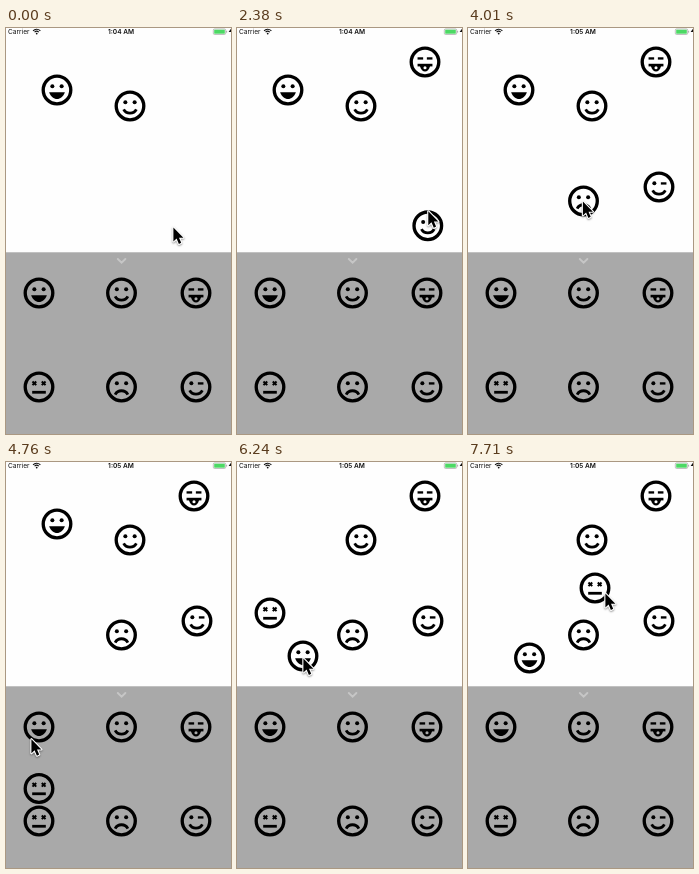
An HTML page with a canvas for the animation above (8 s loop, 225 by 406 pixels).

```html
<!DOCTYPE html>
<html lang="en">
<head>
<meta charset="utf-8">
<style>
  html, body { margin: 0; width: 100%; height: 100%; overflow: hidden; background: #fefefe; }
  canvas { display: block; width: 225px; height: 406px; }
</style>
</head>
<body>
<canvas id="stage"></canvas>
<script>
const W = 225, H = 406, LOOP = 8000;
const STEP = 148.2, LAST = 52;   // the picture advances in even steps
const LAG = 0.3;                 // a dragged face trails the pointer, in steps
const PANEL = '#a9a9a9', PAPER = '#fefefe';
const canvas = document.getElementById('stage');
const ctx = canvas.getContext('2d');
const dpr = window.devicePixelRatio || 1;
canvas.width = W * dpr;
canvas.height = H * dpr;

const columns = [33, 115.5, 190], rows = [265, 359];
const slots = {};
['grin', 'smile', 'tongue', 'dead', 'sad', 'wink'].forEach((kind, i) => {
  slots[kind] = [columns[i % 3], rows[Math.floor(i / 3)]];
});

const board = { grin: [51, 62], smile: [124, 78] };
const home = [167, 199];

// The pointer reaches for a face, then pulls it; spans are in steps
const drags = [
  { kind: 'tongue', grip: [-7, 5], reach: [0, 2], pull: [3, 5.7], to: [188, 34] },
  { kind: 'wink', grip: [0, 2], reach: [8, 9.9], bow: -33, pull: [12.9, 16.8], to: [191, 159] },
  { kind: 'sad', grip: [-1, 0], reach: [19, 23], pull: [24, 26.7], to: [115.5, 173] },
  { kind: 'dead', grip: [-8, -9], reach: [28, 31], pull: [31.2, 33.2], to: [33, 151] },
  { kind: 'grin', grip: [0, 2], reach: [35, 37], pull: [38, 41.7], to: [66, 194] },
  { kind: 'grin', grip: [0, 2], reach: [41.7, 42], pull: [42, 43], to: [61.5, 196] },
  { kind: 'dead', grip: [10, 5], reach: [44, 46], pull: [46, 49.7], to: [139, 126] },
  { kind: 'dead', grip: [10, 5], reach: [49.7, 50], pull: [50, 51.7], to: [127, 126] }
];

function glide([ax, ay], [bx, by], [t0, t1], t, bow = 0) {
  const u = Math.max(0, Math.min(1, (t - t0) / (t1 - t0)));
  const e = u * u * (3 - 2 * u);
  return [ax + (bx - ax) * e + bow * Math.sin(Math.PI * u), ay + (by - ay) * e];
}

const add = (p, q) => [p[0] + q[0], p[1] + q[1]];

function pose(n) {
  const faces = { ...board }, rest = { ...slots, ...board };
  let pointer = home;
  for (const { kind, grip, reach, bow, pull, to } of drags) {
    pointer = glide(pointer, add(rest[kind], grip), reach, n, bow);
    pointer = glide(pointer, add(to, grip), pull, n);
    if (n > pull[0]) faces[kind] = glide(faces[kind] || rest[kind], to, pull, n - LAG);
    rest[kind] = to;
  }
  return { faces, pointer };
}

function line(width, ...pts) {
  ctx.lineWidth = width;
  ctx.beginPath();
  pts.forEach(([x, y]) => ctx.lineTo(x, y));
  ctx.stroke();
}

function dot(x, y, r) {
  ctx.beginPath();
  ctx.arc(x, y, r, 0, 7);
  ctx.fill();
}

function bowl(half, y, depth) {
  ctx.beginPath();
  ctx.moveTo(-half, y);
  ctx.bezierCurveTo(-half * 0.6, y + depth, half * 0.6, y + depth, half, y);
}

function lips(y, depth) {
  bowl(4.1, y, depth);
  ctx.lineWidth = 1.8;
  ctx.stroke();
}

const roundEye = x => dot(x, -2.4, 1.3);
const shutEye = x => line(1.5, [x - 1.8, -2.3], [x + 1.8, -2.3]);
function crossEye(x) {
  for (const s of [-1.2, 1.2]) line(1.3, [x - s, -3.6], [x + s, -1.2]);
}
const eyes = (left, right = left) => { left(-3); right(3); };

const features = {
  grin() { eyes(roundEye); bowl(5.1, 1.5, 5.8); ctx.fill(); },
  smile() { eyes(roundEye); lips(2.1, 3.3); },
  sad() { eyes(roundEye); lips(4.9, -3.3); },
  wink() { eyes(roundEye, shutEye); lips(2.1, 3.3); },
  dead() { eyes(crossEye); line(1.8, [-4.4, 3.4], [4.4, 3.4]); },
  tongue(bg) {
    eyes(shutEye);
    line(1.7, [-4.8, 2], [4.8, 2]);
    bowl(3.3, 2.6, 4.8);
    ctx.fill();
    ctx.fillStyle = bg;
    dot(0, 3.7, 1);
  }
};

function face(kind, [x, y], bg) {
  ctx.save();
  ctx.translate(x, y);
  ctx.scale(1.55, 1.55);
  ctx.fillStyle = ctx.strokeStyle = '#000';
  ctx.lineWidth = 2.15;
  ctx.beginPath();
  ctx.arc(0, 0, 8.9, 0, 7);
  ctx.stroke();
  features[kind](bg);
  ctx.restore();
}

function statusBar(clock) {
  ctx.fillStyle = ctx.strokeStyle = '#111';
  ctx.textAlign = 'left';
  ctx.font = '6.6px Inter, sans-serif';
  ctx.fillText('Carrier', 2, 6.2);
  ctx.textAlign = 'center';
  ctx.font = '600 6.6px Inter, sans-serif';
  ctx.fillText(clock, 115, 6.2);

  ctx.lineWidth = 1.1;
  for (const r of [2.9, 5]) {
    ctx.beginPath();
    ctx.arc(30.7, 6.2, r, -Math.PI * 0.76, -Math.PI * 0.24);
    ctx.stroke();
  }
  dot(30.7, 5.6, 0.9);

  ctx.strokeStyle = '#999';
  ctx.lineWidth = 0.6;
  ctx.beginPath();
  ctx.roundRect(207.3, 0.9, 12.4, 5.6, 1.3);
  ctx.stroke();
  ctx.fillStyle = '#4cd964';
  ctx.fillRect(208.2, 1.7, 10.6, 4);
  ctx.fillStyle = '#999';
  ctx.fillRect(220.3, 2.8, 0.8, 1.8);
  ctx.fillStyle = '#111';
  ctx.beginPath();
  ctx.moveTo(225, 0.8);
  ctx.lineTo(222.6, 4);
  ctx.lineTo(225, 4);
  ctx.fill();
}

function panel() {
  ctx.fillStyle = PANEL;
  ctx.fillRect(0, 224.3, W, H);
  ctx.strokeStyle = '#c6c6c6';
  ctx.lineCap = 'round';
  line(1.9, [111.8, 231], [115.6, 234.6], [119.4, 231]);
  ctx.lineCap = 'butt';
  for (const kind in slots) face(kind, slots[kind], PANEL);
}

function arrow([x, y]) {
  const outline = [[0, 0], [0, 14], [3.2, 11], [5.5, 16.4], [7.8, 15.3], [5.6, 10.2], [10, 10.2]];
  ctx.save();
  ctx.translate(x + 0.4, y + 0.5);
  ctx.beginPath();
  outline.forEach(p => ctx.lineTo(...p));
  ctx.closePath();
  ctx.lineJoin = 'round';
  ctx.lineWidth = 2.2;
  ctx.strokeStyle = '#fff';
  ctx.shadowColor = 'rgba(0,0,0,.4)';
  ctx.shadowBlur = 2 * dpr;
  ctx.shadowOffsetY = dpr;
  ctx.stroke();
  ctx.shadowColor = 'transparent';
  ctx.fillStyle = '#000';
  ctx.fill();
  ctx.restore();
}

function draw(ms) {
  const n = Math.min(LAST, Math.floor(ms / STEP));
  const { faces, pointer } = pose(n);
  ctx.setTransform(dpr, 0, 0, dpr, 0, 0);
  ctx.fillStyle = PAPER;
  ctx.fillRect(0, 0, W, H);
  statusBar(n < 24 ? '1:04 AM' : '1:05 AM');
  panel();
  for (const kind in faces) face(kind, faces[kind], faces[kind][1] < 224 ? PAPER : PANEL);
  arrow(pointer);
}

const start = performance.now();
function tick() {
  draw((performance.now() - start) % LOOP);
  requestAnimationFrame(tick);
}
tick();
</script>
</body>
</html>
```
